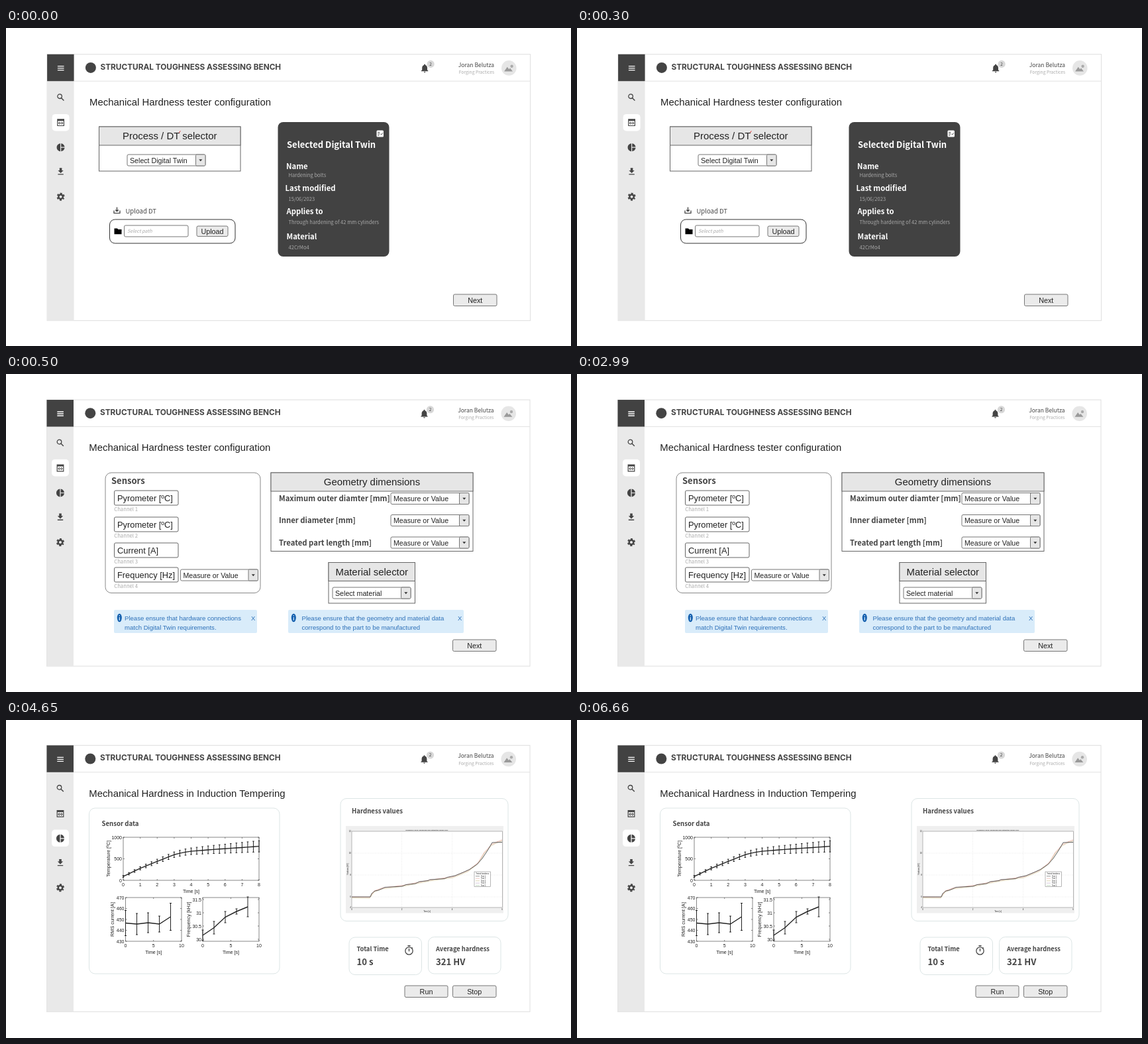
Write an HTML page that moves like this. It is 853 px wide and 480 px high and loops after 8000 ms.

```html
<!DOCTYPE html>
<html lang="en">
<head>
<meta charset="utf-8">
<title>Hardness tester</title>
<style>
  html, body { margin: 0; width: 100%; height: 100%; overflow: hidden; background: #fff; }
  svg { display: block; width: 100%; height: 100%; }
  text { font-family: "Liberation Sans", Arial, sans-serif; fill: #222; white-space: pre; }
  .sans { font-family: "Noto Sans CJK JP", "Noto Sans CJK SC", "Noto Sans CJK", sans-serif; fill: #444; }
  .bold { font-weight: 600; }
  .title { font-family: Inter, sans-serif; font-weight: 700; fill: #444; }
  .white { fill: #fff; }
  .pale { fill: #aaa; }
  .dim { fill: #a9a9a9; }
  .blue { fill: #2d70b8; }
  .mid { text-anchor: middle; }
  .end { text-anchor: end; }
</style>
</head>
<body>
<svg id="stage" viewBox="0 0 853 480" preserveAspectRatio="none"></svg>
<script>
const text = (x, y, size, string, cls = "", extra = "") =>
  `<text x="${x}" y="${y}" font-size="${size}" class="${cls}" ${extra}>${string}</text>`;

const box = (x1, y1, x2, y2, fill = "#fff", stroke = "none", radius = 0, width = 1) =>
  `<rect x="${x1}" y="${y1}" width="${x2 - x1}" height="${y2 - y1}" rx="${radius}" fill="${fill}" stroke="${stroke}" stroke-width="${width}"/>`;

const path = (d, stroke = "#222", width = 1, extra = "") =>
  `<path d="${d}" fill="none" stroke="${stroke}" stroke-width="${width}" ${extra}/>`;

const polyline = (points, stroke, width, extra) =>
  path("M" + points.map(p => p.join(" ")).join("L"), stroke, width, extra);

// Icons are drawn on a 24 unit grid and centred on (x, y).
const icon = (x, y, scale, body) =>
  `<g transform="translate(${x} ${y}) scale(${scale}) translate(-12 -12)" fill="#444">${body}</g>`;

const button = (x1, y1, x2, y2, label) =>
  box(x1, y1, x2, y2, "#ebebeb", "#777", 2) +
  text((x1 + x2) / 2, (y1 + y2) / 2 + 3.8, 10.8, label, "mid");

const select = (x1, y1, label, width = 118, height = 17) => {
  const x2 = x1 + width, y2 = y1 + height, y = y1 + height / 2;
  return box(x1, y1, x2, y2, "#fff", "#777", 2) +
    box(x2 - 14.5, y1, x2, y2, "#e6e6e6", "#777", 1.5) +
    `<path d="M${x2 - 9.7} ${y - 1.2}h5l-2.5 3z" fill="#333"/>` +
    text(x1 + 4, y + 4.3, 10.65, label);
};

const panel = (x1, y1, x2, y2, title) =>
  box(x1, y1, x2, y2, "#fff", "#666") + box(x1, y1, x2, y1 + 28, "#e6e6e6", "#666") +
  text((x1 + x2) / 2, y1 + 19, 14.95, title, "mid");

const notice = (x1, x2, textX, lines) =>
  box(x1, 356, x2, 391, "#d9ecfa", "none", 2) +
  `<ellipse cx="${x1 + 8.3}" cy="368" rx="3.5" ry="6.3" fill="#135fae"/>` +
  path(`M${x1 + 8.3} 364v1.4m0 1.6v5`, "#d9ecfa", 1.2) +
  text(textX, 372, 9.57, lines[0], "blue") + text(textX, 385.5, 9.57, lines[1], "blue") +
  text(x2 - 9, 371.5, 9.5, "X", "blue");

const card = (x1, y1, x2, y2) => box(x1, y1, x2, y2, "#fff", "#d9e2e2", 9, 0.9);

const ICONS = {
  search: '<circle cx="9.5" cy="9.5" r="5.5" fill="none" stroke="#444" stroke-width="2.1"/><path d="M14 14l6 6" stroke="#444" stroke-width="2.4"/>',
  window: '<path d="M3 3h18v18H3zM5 8v11h14V8z" fill-rule="evenodd"/><path d="M10 10.5L7 13.5l3 3M14 10.5l3 3-3 3" fill="none" stroke="#444" stroke-width="1.8"/><circle cx="12" cy="13.5" r="1.5"/>',
  pie: '<path d="M11 2v20c-5.1-.5-9-4.8-9-10s3.9-9.5 9-10zm2 0v9h9c-.5-4.7-4.3-8.5-9-9zm0 11v9c4.7-.5 8.5-4.3 9-9z"/>',
  download: '<path d="M19 9h-4V3H9v6H5l7 7zM5 18v2.2h14V18z"/>',
  gear: '<circle cx="12" cy="12" r="5.4" fill="none" stroke="#444" stroke-width="4"/><circle cx="12" cy="12" r="8.4" fill="none" stroke="#444" stroke-width="3.2" stroke-dasharray="4.8 3.996" stroke-dashoffset="2.4" transform="rotate(30 12 12)"/>',
  bell: '<path d="M12 22a2 2 0 0 0 2-2h-4a2 2 0 0 0 2 2zm6-6v-5c0-3.1-1.6-5.6-4.5-6.3V4a1.5 1.5 0 0 0-3 0v.7C7.6 5.4 6 7.9 6 11v5l-2 2v1h16v-1z"/>',
  tray: '<path d="M3 12v8h18v-8M12 2v12M7.5 10l4.5 4.5 4.5-4.5" fill="none" stroke="#333" stroke-width="2.4"/>',
  timer: '<circle cx="12" cy="13.5" r="8.3" fill="none" stroke="#444" stroke-width="1.9"/><path d="M9 2h6M12 8.5v6M18 6l1.8 1.6" stroke="#444" stroke-width="2"/>'
};

function chrome(activeY, dx, dy) {
  const sidebar = [["search", 104], ["window", 142], ["pie", 179.5], ["download", 216], ["gear", 254]];
  return `<g transform="translate(${dx} ${dy})">` +
    box(61.5, 39, 791, 441, "#fff", "#dedede") +
    box(61.5, 79, 102, 441, "#e9e9e9") +
    box(61.5, 39, 102, 79.5, "#424242") +
    path("M102 79.5H791", "#e2e2e2") +
    path("M77.3 57h9.6m-9.6 3h9.6m-9.6 3h9.6", "#fff", 1.3) +
    box(69, activeY - 12.8, 95, activeY + 12.8, "#fff", "none", 5) +
    sidebar.map(([name, y]) => icon(82, y, 0.6, ICONS[name])).join("") +
    '<circle cx="127.3" cy="59.2" r="8" fill="#444"/>' +
    text(142, 62, 11.8, "STRUCTURAL TOUGHNESS ASSESSING BENCH", "title") +
    icon(631.5, 60, 0.65, ICONS.bell) +
    '<circle cx="640.5" cy="53.7" r="5.6" fill="#d8d8d8"/>' +
    text(640.5, 56, 6.5, "2", "sans mid") +
    text(736.5, 58, 8.5, "Joran Belutza", "sans end") +
    text(736.5, 68.3, 6.7, "Forging Practices", "sans pale end") +
    '<circle cx="758.7" cy="59.7" r="11.3" fill="#e6e6e6"/>' +
    '<path d="M751.5 64.8l4.7-6.8 2.6 3.5 1.6-1.6 4 4.9z" fill="#9a9a9a"/><circle cx="763" cy="57" r="2.2" fill="#aaa"/>' +
    "</g>";
}

function selectorScene() {
  const details = [
    [423, 212.5, "Name", "Hardening bolts"],
    [421.5, 246, "Last modified", "15/06/2023"],
    [423.5, 281, "Applies to", "Through hardening of 42 mm cylinders"],
    [423.5, 319, "Material", "42CrMo4"]
  ];
  return chrome(142, 0.6, 0.7) +
    text(126, 117, 14.9, "Mechanical Hardness tester configuration") +
    panel(140.5, 149, 354, 216, "Process / DT selector") +
    path("M261.3 158.3l2-3", "#d33", 1) +
    select(183, 191, "Select Digital Twin") +
    icon(167.5, 275.5, 0.5, ICONS.tray) +
    text(180.5, 279.7, 9.5, "Upload DT", "sans", 'font-weight="500"') +
    box(156.5, 289, 346, 325, "#fff", "#333", 8) +
    '<path d="M163.5 302.5h4.5l1.3 1.4h5.2v7.3h-11z"/>' +
    box(178.5, 298, 275, 315, "#fff", "#777", 2) +
    text(183, 309, 7.2, "Select path", "sans pale", 'font-style="italic"') +
    button(288, 299, 335, 314.5, "Upload") +
    box(410.5, 142, 578.5, 345, "#424242", "none", 8) +
    box(559.5, 154.5, 570, 164.5, "#fff", "none", 1.5) +
    path("M561.3 157.5h3m-3 2.3h3m-3 2.3h2m2.2-2.3l1.2 1.2 2.1-2.6", "#424242", 1) +
    text(424, 180.7, 13, "Selected Digital Twin", "sans bold white") +
    details.map(([x, y, label, value], i) =>
      text(x, y, 11.3, label, "sans bold white") +
      text(426.5, y + (i ? 15 : 12.5), 7.6, value, "sans dim")).join("") +
    button(675.5, 402, 741, 419.5, "Next");
}

function parametersScene() {
  const sensors = [[176, "Pyrometer [ºC]"], [216, "Pyrometer [ºC]"], [255, "Current [A]"], [292, "Frequency [Hz]"]];
  const sizes = [[192, "Maximum outer diamter [mm]"], [225, "Inner diameter [mm]"], [258.5, "Treated part length [mm]"]];
  return chrome(141.6, 0, 0) +
    text(125.3, 116.3, 14.9, "Mechanical Hardness tester configuration") +
    box(150, 149, 384, 330.5, "#fff", "#888", 9) +
    text(159, 165.5, 13, "Sensors", "sans bold") +
    sensors.map(([y, label], i) =>
      box(163.5, y, 260, y + 22, "#fff", "#666", 2) +
      text(168, y + 15.7, 12.83, label) +
      text(163.3, y + 31, 7.7, "Channel " + (i + 1), "sans pale")).join("") +
    select(263.5, 295, "Measure or Value", 117) +
    panel(400, 149, 705, 267.5, "Geometry dimensions") +
    sizes.map(([y, label]) =>
      text(412, y, 11.3, label, "sans bold") + select(581, y - 12.5, "Measure or Value")).join("") +
    panel(487, 284.5, 617.5, 346, "Material selector") +
    select(493, 322, "Select material") +
    notice(163, 379, 179, ["Please ensure that hardware connections", "match Digital Twin requirements."]) +
    notice(426, 691, 446.5, ["Please ensure that the geometry and material data", "correspond to the part to be manufactured"]) +
    button(674.5, 401, 740, 418.5, "Next");
}

const interpolate = (points, x) => {
  const i = Math.max(1, points.findIndex(p => p[0] >= x));
  const [[x0, y0], [x1, y1]] = [points[i - 1], points[i]];
  return y0 + (y1 - y0) * (x - x0) / (x1 - x0);
};

// Plot frame with ticks; each tick is [position, label].
function axes(x1, y1, x2, y2, xTicks, yTicks, yLabel, labelX) {
  const cy = (y1 + y2) / 2;
  return box(x1, y1, x2, y2, "#fff", "#555", 0, 0.7) +
    xTicks.map(([x, s]) => path(`M${x} ${y2}v-2M${x} ${y1}v2`, "#555", 0.7) +
      text(x, y2 + 9, 7, s, "mid")).join("") +
    yTicks.map(([y, s]) => path(`M${x1} ${y}h2M${x2} ${y}h-2`, "#555", 0.7) +
      text(x1 - 2, y + 2.5, 7, s, "end")).join("") +
    text((x1 + x2) / 2, y2 + 18.5, 7.1, "Time [s]", "mid") +
    text(labelX, cy, 7.3, yLabel, "mid", `transform="rotate(-90 ${labelX} ${cy})"`);
}

const errorBars = (points, cap, width) =>
  polyline(points.map(p => p.slice(0, 2)), "#222", 1.4) +
  points.map(([x, y, e]) =>
    path(`M${x} ${y - e}v${2 * e}M${x - cap} ${y - e}h${2 * cap}M${x - cap} ${y + e}h${2 * cap}`, "#222", width)).join("");

function sensorCharts() {
  const heating = [[0, 90], [1, 280], [2, 440], [3, 595], [3.5, 645], [4, 675], [5, 708], [6, 735], [8, 790]];
  const temperature = Array.from({ length: 25 }, (_, i) =>
    [177 + i * 205 / 24, 242 - 0.065 * interpolate(heating, i / 3), 1.5 + 7 * i / 24]);
  const series = (x0, ys, errors) => ys.map((y, i) => [x0 + i * 17, y, errors[i]]);
  return axes(177, 177, 382, 242, Array.from({ length: 9 }, (_, i) => [177 + i * 25.63, i]),
      [[177, 1000], [209.5, 500], [242, 0]], "Temperature [ºC]", 157) +
    errorBars(temperature, 1.3, 1) +
    axes(180.5, 268, 265, 334, [[180.5, 0], [222.7, 5], [265, 10]],
      [[268, 470], [284.5, 460], [301, 450], [317.5, 440], [334, 430]], "RMS current [A]", 162.5) +
    errorBars(series(180.5, [306.5, 308, 306, 308, 297], [19, 16, 15, 12, 20.5]), 1.5, 1) +
    axes(297, 268, 382, 334, [[297, 0], [339.5, 5], [382, 10]],
      [[271, 31.5], [291, 31], [311, 30.5], [331, 30]], "Frequency [kHz]", 277.5) +
    errorBars(series(297, [325, 313.5, 297.5, 289, 282], [8, 9.5, 8.5, 4, 15]), 1.5, 1);
}

function hardnessChart() {
  const curve = [[522, 267], [550, 267], [552, 262], [557, 258], [562, 257], [568, 254.5], [572, 252.5], [598, 251],
    [604, 248.5], [618, 247], [624, 244], [637, 242.5], [640, 241], [662, 239.5], [666, 237.5], [678, 235],
    [690, 230], [700, 225.5], [711, 218], [719, 209], [727, 197], [734, 185], [749, 184.5]];
  const smooth = [[522, 267], [549, 267.5], [556, 258], [568, 253.5], [600, 249.5], [640, 241.5], [675, 236.5],
    [698, 227], [713, 215], [722, 200], [733, 188], [741, 184], [749, 181]];
  const xs = [522, 597.5, 673.5, 749], ys = [168, 201, 234, 267, 283];
  return box(513, 160, 751, 291.5, "#efefef") + box(522, 168, 749.5, 283, "#fff", "#888", 0, 0.6) +
    path("M597.5 168V283M673.5 168V283M522 201H749M522 234H749M522 267H749", "#ddd", 0.6, 'stroke-dasharray="1 1.5"') +
    polyline(smooth, "#e8a79a", 0.8) +
    polyline(smooth.map(([x, y]) => [x, y + 1.5]), "#c9bd8a", 0.6) +
    polyline(curve, "#555", 0.95) +
    xs.map((x, i) => text(x, 286.7, 3, i * 2, "mid")).join("") +
    ys.map((y, i) => text(521, y + 1, 3, 12 - i * 2, "end")).join("") +
    text(635.5, 167, 2.5, "Hardness curve: measured and estimated values (HV)", "mid", 'font-weight="700"') +
    text(635.5, 290.3, 3, "Time [s]", "mid") +
    text(516.5, 225, 2.6, "Hardness [HV]", "mid", 'transform="rotate(-90 516.5 225)"') +
    box(707, 229, 731.5, 251.5, "#fff", "#888", 0, 0.6) +
    text(719.2, 232.6, 2.7, "Tested hardness", "mid") +
    ["#555", "#e8a79a", "#c9bd8a", "#b9a6c4", "#9fc49c"].map((color, i) =>
      path(`M709 ${235.7 + i * 3.5}h6`, color, 0.6) + text(717, 236.7 + i * 3.5, 2.7, "Test " + (i + 1))).join("");
}

function resultsScene() {
  return chrome(179, 0, -0.7) +
    text(125.3, 115.6, 14.87, "Mechanical Hardness in Induction Tempering") +
    card(125.5, 133, 413, 383) +
    text(144.5, 159.5, 9.6, "Sensor data", "sans bold") +
    sensorCharts() +
    card(505, 118.5, 758, 303.5) +
    text(522, 140.5, 9.6, "Hardness values", "sans bold") +
    hardnessChart() +
    card(518, 328, 627.5, 384.5) + card(637.5, 327.5, 747, 383) +
    text(529.5, 349, 9.35, "Total Time", "sans bold") +
    icon(608.5, 347.5, 0.68, ICONS.timer) +
    text(529.5, 370, 13.2, "10 s", "sans bold") +
    text(649, 349, 9.35, "Average hardness", "sans bold") +
    text(649, 370, 13.2, "321 HV", "sans bold") +
    button(602, 401, 667, 418.5, "Run") +
    button(674.5, 401, 740, 418.5, "Stop");
}

const LOOP = 8000;
const scenes = [[0, selectorScene], [500, parametersScene], [4650, resultsScene]];
const stage = document.getElementById("stage");
stage.innerHTML = scenes.map(([, draw]) => `<g>${draw()}</g>`).join("");
const groups = [...stage.children];
const origin = performance.now();

function render() {
  const time = Math.max(0, performance.now() - origin) % LOOP;
  const current = scenes.filter(([start]) => start <= time).length - 1;
  groups.forEach((group, i) => { group.style.display = i === current ? "" : "none"; });
  requestAnimationFrame(render);
}
render();
</script>
</body>
</html>
```
